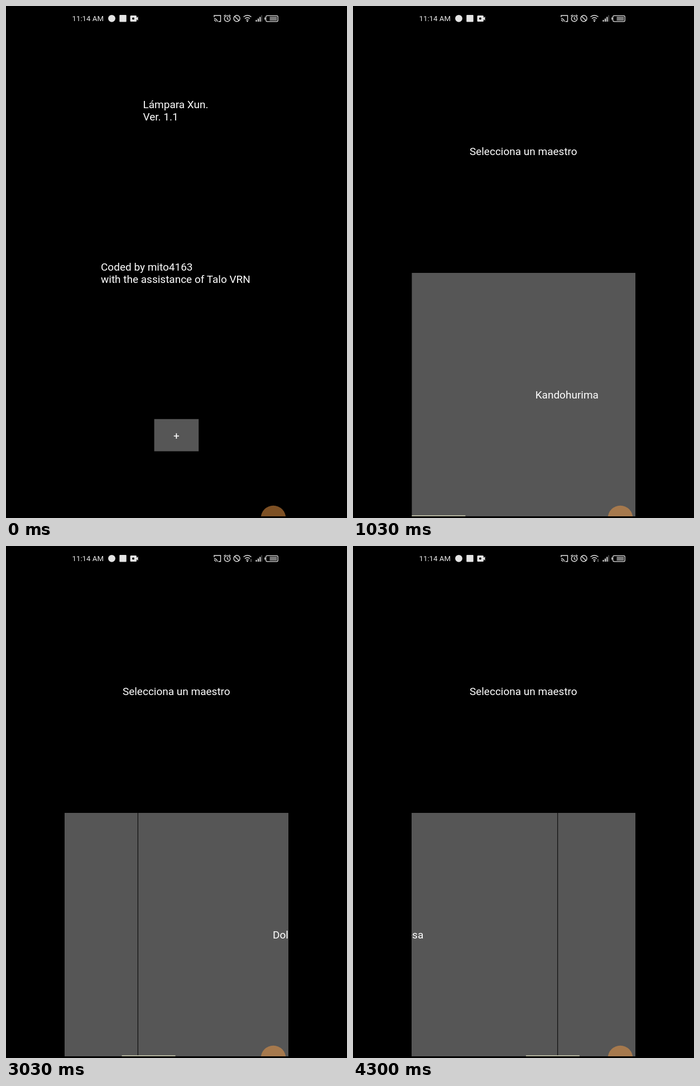
An HTML page that plays this animation: 611x917 px, repeating every 4.33 s.

```html
<!DOCTYPE html>
<html lang="es">
<head>
<meta charset="utf-8">
<style>
  html, body { margin: 0; width: 100%; height: 100%; overflow: hidden; background: #000; }
  svg { display: block; width: 100vw; height: 100vh; font: 19px Roboto, sans-serif; fill: #fff; }
  .mid { text-anchor: middle; }
  .grey { fill: #565656; }
  .clock { font-size: 13.25px; fill: #e8e8e8; }
  .line { fill: none; stroke: #e4e4e4; stroke-width: 1.4; }
  .solid { fill: #e4e4e4; }
</style>
</head>
<body>
<svg viewBox="0 0 611 917">
  <defs>
    <clipPath id="screen"><rect x="105" width="401" height="914"/></clipPath>
  </defs>

  <text class="clock" x="118.5" y="27.4">11:14 AM</text>
  <g class="solid">
    <circle cx="189.5" cy="22.3" r="6.4"/>
    <rect x="203.3" y="16" width="12.4" height="12.6" rx="1"/>
    <path d="M224 17h8.5q1.5 0 1.5 1.5v2.5l2.6-2v7l-2.6-2v2.5q0 1.5-1.5 1.5h-8.5q-1.5 0-1.5-1.5v-8q0-1.5 1.5-1.5z"/>
    <circle cx="228" cy="22.4" r="2" fill="#000"/>
  </g>

  <g class="line">
    <path d="M373 20v-3h11.5v10.8h-4M373 22.5a5.5 5.5 0 0 1 5.5 5.5M373 25.3a2.5 2.5 0 0 1 2.5 2.7"/>
    <circle cx="396.5" cy="22.6" r="5.2"/>
    <path d="M396.5 19.5v3.5l2.3 1.5M390.5 18.2l3-2.5M402.5 18.2l-3-2.5"/>
    <circle cx="413.6" cy="22.3" r="5.5"/>
    <path d="M409.7 18.4l7.8 7.8"/>
    <path d="M425.5 19.5q7-5.5 14 0M428 22.5q4.5-3.5 9 0M430.3 25.2q2.2-1.6 4.4 0"/>
    <rect x="465.7" y="17.3" width="21.6" height="10.6" rx="2.3" stroke-width="1.2"/>
  </g>
  <g class="solid">
    <circle cx="432.5" cy="27.3" r="1.2"/>
    <path d="M447.5 25h2v3h-2zM451 22.5h2v5.5h-2zM454.3 19.5h2v8.5h-2zM463.2 20.5h1.5v4h-1.5z"/>
    <path fill="#555" d="M457.5 16.5h1.5v11.5h-1.5z"/>
    <path fill="#777" d="M472.5 19h13v7.2h-13z"/>
    <path id="traffic" d="M438.3 24h1.5v1.5h-1.5zM438.3 26.5h1.5v1.5h-1.5z" opacity=".8"/>
  </g>

  <g clip-path="url(#screen)">
    <g id="intro">
      <text x="245.5" y="183">Lámpara Xun.</text>
      <text x="245.5" y="205.4">Ver. 1.1</text>
      <text x="170" y="474">Coded by mito4163</text>
      <text x="170" y="496.4">with the assistance of Talo VRN</text>
      <rect class="grey" x="265.6" y="739.8" width="79.6" height="57.7"/>
      <text class="mid" x="305.3" y="776.3">+</text>
    </g>
    <g id="chooser">
      <text class="mid" x="305.3" y="267">Selecciona un maestro</text>
      <g id="list">
        <rect class="grey" x="105.4" y="478" width="556" height="436"/>
        <rect class="grey" x="662.4" y="478" width="556" height="436"/>
        <rect class="grey" x="1219.4" y="478" width="556" height="436"/>
        <text class="mid" x="383.3" y="703.3">Kandohurima</text>
        <text class="mid" x="941" y="703.3">Doluresa</text>
      </g>
      <rect id="bar" x="105.4" y="912" width="96" height="2" fill="#bcbca4"/>
    </g>
    <circle cx="479" cy="917.2" r="22.4" fill="#f09a46" opacity=".52"/>
  </g>
</svg>
<script>
  const LOOP = 4330, FPS = 30, WIDTH = 401, CONTENT = 1671, GLIDE = 413;
  const SLIDE_START = 631.5, SLIDE_TIME = 400;
  const DRAG_START = 2065, FADE_START = 1132, FADE_TIME = 500;

  const el = id => document.getElementById(id);
  const clamp = v => Math.min(1, Math.max(0, v));
  const shift = (id, x) => el(id).setAttribute('transform', `translate(${x} 0)`);

  const hold = t => Math.round(Math.floor((t + 4) * FPS / 1000) * 100 / FPS) * 10;

  // Finger positions as [time, scroll], joined by straight lines.
  function drag(t, points) {
    let pos = points[0][1];
    for (let i = 1; i < points.length; i++) {
      const [t0, a] = points[i - 1], [t1, b] = points[i];
      pos += (b - a) * clamp((t - t0) / (t1 - t0));
    }
    return pos;
  }

  const coast = (t, start, from, reach) =>
    from + reach * (1 - Math.exp(-(t - start) / GLIDE));

  function scrollAt(t) {
    if (t < 2230) return drag(t, [[DRAG_START, 0], [2100, 26], [2230, 150]]);
    if (t < 3130) return coast(t, 2230, 150, 322);
    if (t < 3230) return drag(t, [[3130, 436], [3200, 507], [3230, 546]]);
    return coast(t, 3230, 546, 331);
  }

  function draw(t) {
    const slide = 1 - (1 - clamp((t - SLIDE_START) / SLIDE_TIME)) ** 2;
    shift('intro', -WIDTH * slide);
    shift('chooser', WIDTH * (1 - slide));
    el('chooser').setAttribute('visibility', slide ? 'visible' : 'hidden');

    const scroll = scrollAt(t);
    shift('list', -scroll);
    shift('bar', scroll * WIDTH / CONTENT);

    const fade = t < DRAG_START ? 1 - (1 - clamp((t - FADE_START) / FADE_TIME)) ** 4 : 0;
    el('bar').setAttribute('opacity', 0.9 - 0.7 * fade);
    el('traffic').setAttribute('visibility', t < 2400 ? 'hidden' : 'visible');
  }

  const begin = performance.now();
  function tick() {
    draw(hold((performance.now() - begin) % LOOP));
    requestAnimationFrame(tick);
  }
  tick();
</script>
</body>
</html>
```
